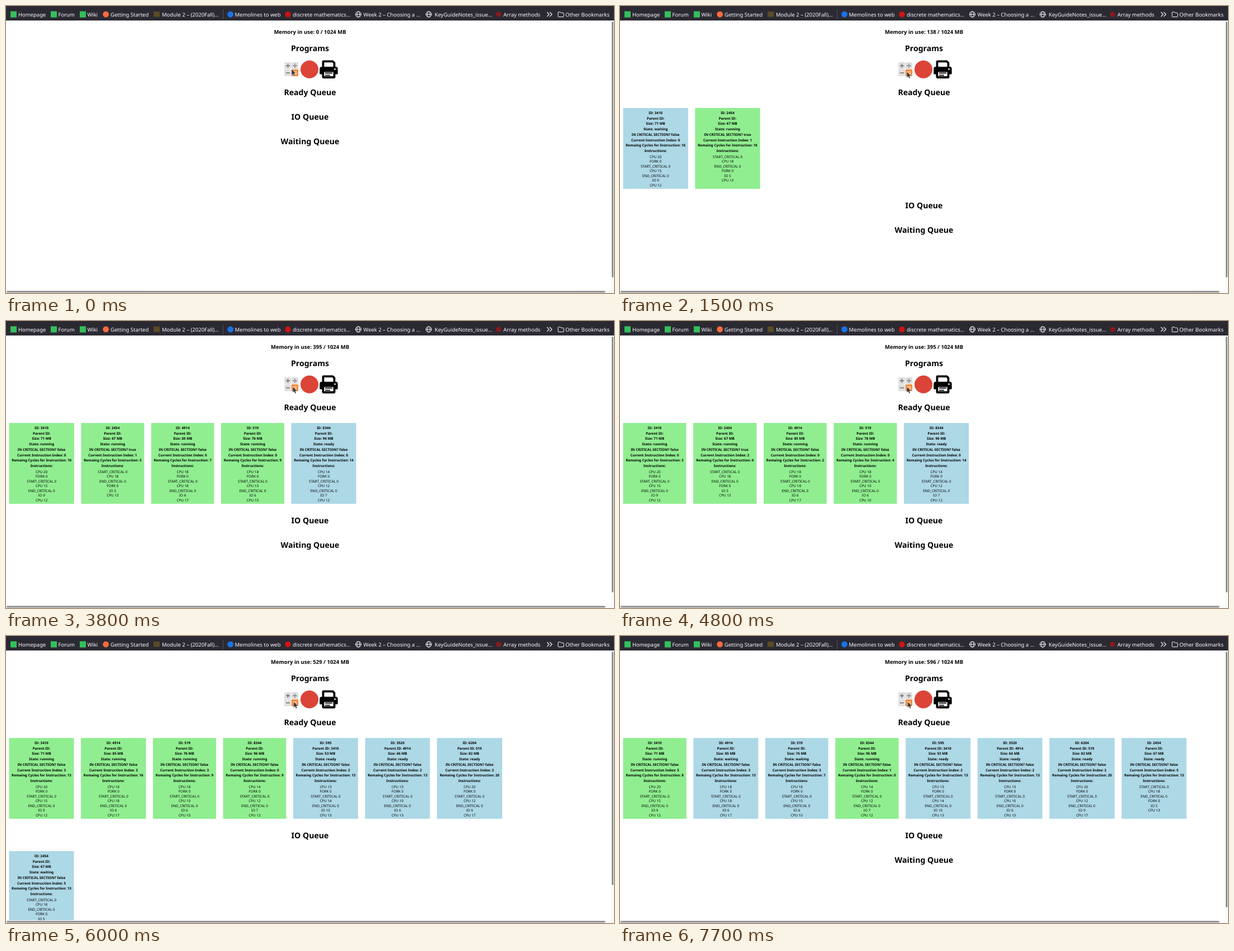
These frames come from a looping animation (1088x515 px, 8 s). An HTML page:

```html
<!DOCTYPE html>
<html lang="en">
<head>
<meta charset="utf-8">
<title>Process scheduler</title>
<style>
  html, body { margin: 0; width: 100%; height: 100%; overflow: hidden; background: #fff; }
  svg { display: block; width: 1088px; height: 515px; }
  text { font-family: "Noto Sans", sans-serif; text-rendering: geometricPrecision; white-space: pre; }
  .mid text { text-anchor: middle; }
  .bar text { font-size: 9.5px; fill: #fbfbfe; }
  .head { font-size: 14.1px; font-weight: 700; }
  .mem { font-size: 9.5px; font-weight: 700; }
  .bold { font-size: 6.26px; font-weight: 700; }
  .code { font-size: 6.3px; }
</style>
</head>
<body>
<svg viewBox="0 0 1088 515" xmlns="http://www.w3.org/2000/svg">
  <defs>
    <clipPath id="page"><rect y="26" width="1083" height="484"/></clipPath>
    <g id="globe" fill="none" stroke="#fbfbfe">
      <circle r="5"/><ellipse rx="2.3" ry="5"/><path d="M-5 0H5"/>
    </g>
  </defs>
  <rect width="1088" height="515" fill="#fff"/>

  <g class="mid" clip-path="url(#page)">
    <text id="mem" class="mem" x="544" y="49.8"></text>
    <text class="head" x="544" y="81">Programs</text>
    <text class="head" x="544" y="160">Ready Queue</text>
    <text id="ioHead" class="head" x="544">IO Queue</text>
    <text id="waitHead" class="head" x="544">Waiting Queue</text>
    <g id="cards"></g>
  </g>

  <g id="calculator">
    <g fill="#e0e0e0">
      <rect x="498" y="101" width="12.3" height="12.3" rx="1.5"/>
      <rect x="510.8" y="101" width="12.3" height="12.3" rx="1.5"/>
      <rect x="498" y="113.8" width="12.3" height="12.3" rx="1.5"/>
    </g>
    <rect x="510.8" y="113.8" width="12.3" height="12.3" rx="1.5" fill="#f58b3c"/>
    <path d="M501 107.2h7M504.5 103.7v7M513.5 107.2h7M501 120h7" stroke="#6b6b6b" stroke-width="1.4"/>
    <circle cx="517" cy="104.4" r=".9" fill="#6b6b6b"/>
    <circle cx="517" cy="110" r=".9" fill="#6b6b6b"/>
    <path d="M513.5 118.4h7M513.5 121.6h7" stroke="#fff" stroke-width="1.3"/>
  </g>
  <circle cx="543" cy="113.7" r="16" fill="#db4437"/>
  <g id="printer">
    <path d="M567.5 109V100.2Q567.5 99.3 568.4 99.3H584.6L587.5 102.2V109" fill="#fff" stroke="#000" stroke-width="3.8" stroke-linejoin="round"/>
    <path d="M565 109H590Q593.7 109 593.7 113V121.5Q593.7 122.5 592.7 122.5H562.3Q561.3 122.5 561.3 121.5V113Q561.3 109 565 109Z"/>
    <rect x="567.4" y="116.5" width="20.2" height="11.5" rx="1" fill="#fff" stroke="#000" stroke-width="3.8"/>
    <path d="M571 120.3h13M571 124.4h9" stroke="#000" stroke-width="1.8"/>
    <circle cx="588.6" cy="113.3" r="1.4" fill="#fff"/>
  </g>
  <path id="cursor" d="M0 0V10.4L2.4 8.3L4 12L6 11.2L4.4 7.6H7.6Z" fill="#31363b" stroke="#dcdcdc" stroke-width=".5"/>

  <g class="bar">
    <rect width="1088" height="26" fill="#2b2a33"/>
    <g id="labels"></g>
    <g fill="#35bf5c">
      <rect x="8" y="9.5" width="11" height="11"/>
      <rect x="80" y="9.5" width="11" height="11"/>
      <rect x="132" y="9.5" width="11" height="11"/>
    </g>
    <circle cx="178.7" cy="15" r="5.4" fill="#ff6a3d"/>
    <rect x="264" y="10" width="11" height="9.5" fill="#5b4b25"/>
    <path d="M388.5 6.5V24" stroke="#55545e"/>
    <circle cx="401.6" cy="15" r="5.4" fill="#1a73e8"/>
    <circle cx="504.5" cy="15" r="5.2" fill="#d01313"/>
    <use href="#globe" x="630.5" y="15"/>
    <use href="#globe" x="756.5" y="15"/>
    <circle cx="881.5" cy="15" r="4.6" fill="#8b1a1a"/>
    <path d="M968 11l4 4l-4 4M973 11l4 4l-4 4" fill="none" stroke="#fbfbfe" stroke-width="1.1"/>
    <path d="M988 18.5V12Q988 10.8 989.2 10.8H992L993.3 12.3H996.8Q998 12.3 998 13.5V18.5Q998 19.5 997 19.5H989Q988 19.5 988 18.5Z" fill="none" stroke="#fbfbfe"/>
  </g>

  <rect x="1083" y="26" width="5" height="489" fill="#f9f9fa"/>
  <rect y="510" width="1088" height="5" fill="#f9f9fa"/>
  <rect id="thumb" x="1084" y="28" width="3" rx="1.5" fill="#8f8f92"/>
  <rect x="1" y="511.2" width="1071.5" height="3" rx="1.5" fill="#8f8f92"/>
</svg>
<script>
const LOOP = 8000;
const $ = id => document.getElementById(id);

const bookmarks = {
  22: "Homepage", 93.5: "Forum", 145.5: "Wiki", 187: "Getting Started",
  279: "Module 2 – (2020Fall)…", 409.5: "Memolines to web", 513: "discrete mathematics…",
  639.5: "Week 2 – Choosing a …", 767: "KeyGuideNotes_issue…", 890: "Array methods",
  1001: "Other Bookmarks"
};
$("labels").innerHTML = Object.entries(bookmarks)
  .map(([x, label]) => `<text x="${x}" y="18.6">${label}</text>`).join("");

// Moments when the scheduler shows a new cycle
const ticks = [0, 800, 900, 1000, 1200, 1300, 1500, 1700, 1900, 2200, 2400, 2600, 2800,
  3000, 3500, 3800, 4000, 4200, 4300, 4500, 4800, 5100, 5300, 5500, 5800, 6000,
  6300, 6500, 6700, 6900, 7100, 7300, 7500, 7700];

const critical = (a, b, io, c) =>
  [`CPU ${a}`, "FORK 0", "START_CRITICAL 0", `CPU ${b}`, "END_CRITICAL 0", `IO ${io}`, `CPU ${c}`];

// Phases: "time index cycles state"; running ones lose a cycle per tick
const proc = (id, parent, size, code, phases) => ({
  id, parent, size, code,
  phases: phases.split(", ").map(p => {
    const [at, index, cycles, state = "running", flag] = p.split(" ");
    return { at: +at, index, cycles: +cycles, state, flag };
  })
});

const procs = [
  proc(3410, "", 71, critical(20, 15, 9, 12),
    "800 0 19, 1300 0 16 waiting, 3500 0 11, 4500 0 5, 4800 0 3, 5300 1 0, 5500 3 15, 7100 3 5, 7300 3 2, 7500 4 0, 7700 5 8"),
  proc(2454, "", 67, ["START_CRITICAL 0", "CPU 18", "END_CRITICAL 0", "FORK 0", "IO 5", "CPU 13"],
    "1200 0 0 ready, 1300 1 17 running crit, 3500 1 6 running crit, 4800 2 0 running crit, 5100 4 5 waiting io, 5300 4 4 waiting io, 5500 4 3 waiting io, 5800 4 1 waiting io, 6000 5 13 waiting io, 6500 5 13 ready"),
  proc(4914, "", 85, critical(18, 18, 6, 17),
    "1700 0 17, 3500 0 8, 5300 1 0, 5500 3 18, 6700 3 13 waiting"),
  proc(519, "", 76, critical(18, 10, 6, 10),
    "2200 0 17, 3500 0 10, 5500 1 0, 5800 3 10, 6500 3 7 waiting"),
  proc(8344, "", 96, critical(14, 12, 7, 12),
    "2800 0 14 ready, 5100 0 13, 7500 0 1, 7700 1 0"),
  proc(595, 3410, 53, critical(13, 14, 10, 13), "5500 2 13 ready"),
  proc(3520, 4914, 66, critical(13, 10, 6, 13), "5500 2 13 ready"),
  proc(6204, 519, 82, critical(20, 12, 9, 17), "5800 2 20 ready")
];

function stateAt(p, tick) {
  const phase = p.phases.filter(f => f.at <= ticks[tick]).pop();
  if (!phase) return null;
  const age = phase.state === "running" ? tick - ticks.indexOf(phase.at) : 0;
  return { ...p, ...phase, cycles: Math.max(0, phase.cycles - age) };
}

// A card is as wide as its cycle line, whose digits are proportional
const digit = [4, 3, 3.3, 3.6, 3.7, 3.3, 3.9, 3.2, 3.9, 3.5];
const cardWidth = s => [...String(s.cycles)].reduce((w, d) => w + digit[d], 109.4);

function card(s, x, y) {
  const w = cardWidth(s), cx = x + w / 2;
  const lines = [
    `ID: ${s.id}`, `Parent ID: ${s.parent}`.trim(), `Size: ${s.size} MB`, `State: ${s.state}`,
    `IN CRITICAL SECTION? ${s.flag === "crit"}`, `Current Instruction Index: ${s.index}`,
    `Remaing Cycles for Instruction: ${s.cycles}`, "Instructions:"
  ];
  const put = (list, name, top, pitch) => list.map((line, i) =>
    `<text class="${name}" x="${cx}" y="${y + top + i * pitch}">${line}</text>`).join("");
  const fill = s.state === "running" ? "lightgreen" : "lightblue";
  return `<rect x="${x}" y="${y}" width="${w}" height="145" fill="${fill}"/>` +
    put(lines, "bold", 10.8, 9.78) + put(s.code, "code", 89.6, 8.5);
}

function row(list, y) {
  let x = 5.5;
  return list.map(s => {
    const html = card(s, x, y);
    x += cardWidth(s) + 12.6;
    return html;
  }).join("");
}

let shown = -1;
function render(t) {
  const tick = ticks.filter(at => at <= t).length - 1;
  if (tick === shown) return;
  shown = tick;
  const all = procs.map(p => stateAt(p, tick)).filter(Boolean);
  const io = all.filter(s => s.flag === "io");
  const ready = all.filter(s => s.flag !== "io");
  const back = ready.findIndex(s => s.id === 2454 && s.state === "ready" && s.index === "5");
  if (back >= 0) ready.push(...ready.splice(back, 1));

  const used = ready.reduce((sum, s) => sum + s.size, 0);
  const ioY = ready.length ? 362.6 : 204.2;
  $("mem").textContent = `Memory in use: ${used} / 1024 MB`;
  $("ioHead").setAttribute("y", ioY);
  $("waitHead").setAttribute("y", ioY + (io.length ? 202.6 : 44.2));
  $("cards").innerHTML = row(ready, 183) + row(io, 386);
  $("thumb").setAttribute("height", io.length ? 419 : 459);

  const at = ticks[tick];
  const [cx, cy] = at < 900 ? [511, 113.5] : at < 5100 ? [513.3, 118] : [514.8, 118];
  $("cursor").setAttribute("transform", `translate(${cx} ${cy})`);
}

function frame() {
  render(performance.now() % LOOP);
  requestAnimationFrame(frame);
}
frame();
</script>
</body>
</html>
```
